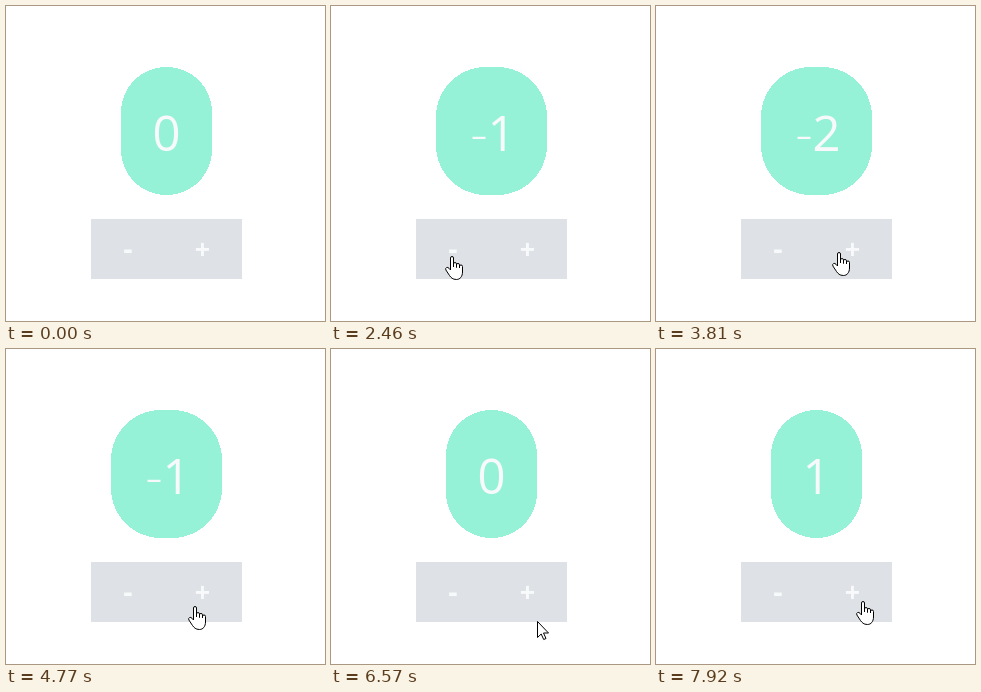
Recreate the animation shown at these times as an HTML page. Size 319 by 315 pixels, loop 7990 ms.

```html
<!DOCTYPE html>
<html lang="en">
<head>
<meta charset="utf-8">
<title>Counter</title>
<style>
  html, body { margin: 0; width: 100%; height: 100%; overflow: hidden; background: #fff; }
  svg { display: block; }
  text { font-family: "Open Sans", "Noto Sans", sans-serif; fill: #f8f9fa; text-anchor: middle; }
  #pill { fill: #96f2d7; shape-rendering: crispEdges; }
  #value { font-size: 49px; }
  #sign { font-size: 56px; font-weight: 300; }
  .label { font-weight: 700; }
  #cursor path { fill: #fff; stroke: #000; }
</style>
</head>
<body>
<svg width="319" height="315" viewBox="0 0 319 315">
  <rect id="pill" y="61" height="128"/>
  <text id="sign" x="148" y="146.5">-</text>
  <text id="value" y="144.5">0</text>
  <rect x="85" y="213" width="151" height="60" fill="#dee2e6"/>
  <text class="label" x="122" y="252.5" font-size="29">-</text>
  <text class="label" x="196.5" y="253" font-size="27">+</text>
  <g id="cursor">
    <path id="arrow" d="M.5 .5V16.5L4.2 13L6.7 18.5L9 17.5L6.5 12H11.5Z"/>
    <path id="hand" transform="translate(-6 0)" d="M5.5 14V2Q5.5 .5 7 .5T8.5 2V11V7.8Q8.5 6.6 10 6.6T11.5 7.8V11.5V8.6Q11.5 7.5 13 7.5T14.5 8.8V12V10Q14.5 9 16 9T17.5 10.5V16C17.5 20.5 15 23.5 11.5 23.5C7.5 23.5 6 21.5 4.5 19.5L.9 14Q.1 12.2 1.6 11.5Q3 11 4 12.3Z"/>
  </g>
</svg>
<script>
const LOOP = 7990;
const STEP = 70;

// Pointer glides: start time, steps taken, resting place
const entry = { x: 210, y: 322 };
const glides = [
  [1390, 8, 117, 248],
  [2460, 1, 120, 250],
  [2530, 6, 159, 258],
  [3120, 6, 112, 253],
  [3810, 3, 238, 240],
  [4150, 3, 184, 249],
  [4490, 11, 190, 260],
  [5300, 3, 193, 262],
  [5570, 7, 199, 245],
  [6100, 4, 206, 294],
  [6570, 4, 206, 243],
  [6910, 5, 206, 290],
  [7380, 2, 206, 284],
  [7650, 5, 206, 251]
].map(([start, steps, x, y]) => ({ start, steps, x, y }));

const clicks = { minus: [2000, 3400], plus: [4560, 5870, 6910] };

const el = id => document.getElementById(id);
const show = (id, on) => el(id).setAttribute("visibility", on ? "visible" : "hidden");
const countUntil = (times, t) => times.filter(time => time <= t).length;
const easeOut = u => 1 - (1 - u) ** 2;

function pointerAt(t) {
  const i = countUntil(glides.map(g => g.start), t) - 1;
  if (i < 0) return null;
  const to = glides[i], from = glides[i - 1] || entry;
  const step = Math.floor((t - to.start) / STEP) + 1;
  const k = easeOut(Math.min(1, step / to.steps));
  const mix = axis => Math.round(from[axis] + (to[axis] - from[axis]) * k);
  return { x: mix("x"), y: mix("y") };
}

function drawCounter(n) {
  const negative = n < 0;
  const width = negative ? 111 : 91;
  const pill = el("pill");
  pill.setAttribute("x", 160.5 - width / 2);
  pill.setAttribute("width", width);
  pill.setAttribute("rx", Math.min(50, width / 2));
  el("value").setAttribute("x", negative ? 170.5 : 160.5);
  el("value").textContent = Math.abs(n);
  show("sign", negative);
}

function drawPointer(pos) {
  const { x, y } = pos || entry;
  const overButton = x >= 85 && x < 236 && y >= 213 && y < 272;
  el("cursor").setAttribute("transform", `translate(${x} ${y})`);
  show("hand", pos && overButton);
  show("arrow", pos && !overButton);
}

const begin = performance.now();
function frame() {
  const t = (performance.now() - begin) % LOOP;
  drawCounter(countUntil(clicks.plus, t) - countUntil(clicks.minus, t));
  drawPointer(pointerAt(t));
  requestAnimationFrame(frame);
}
frame();
</script>
</body>
</html>
```
